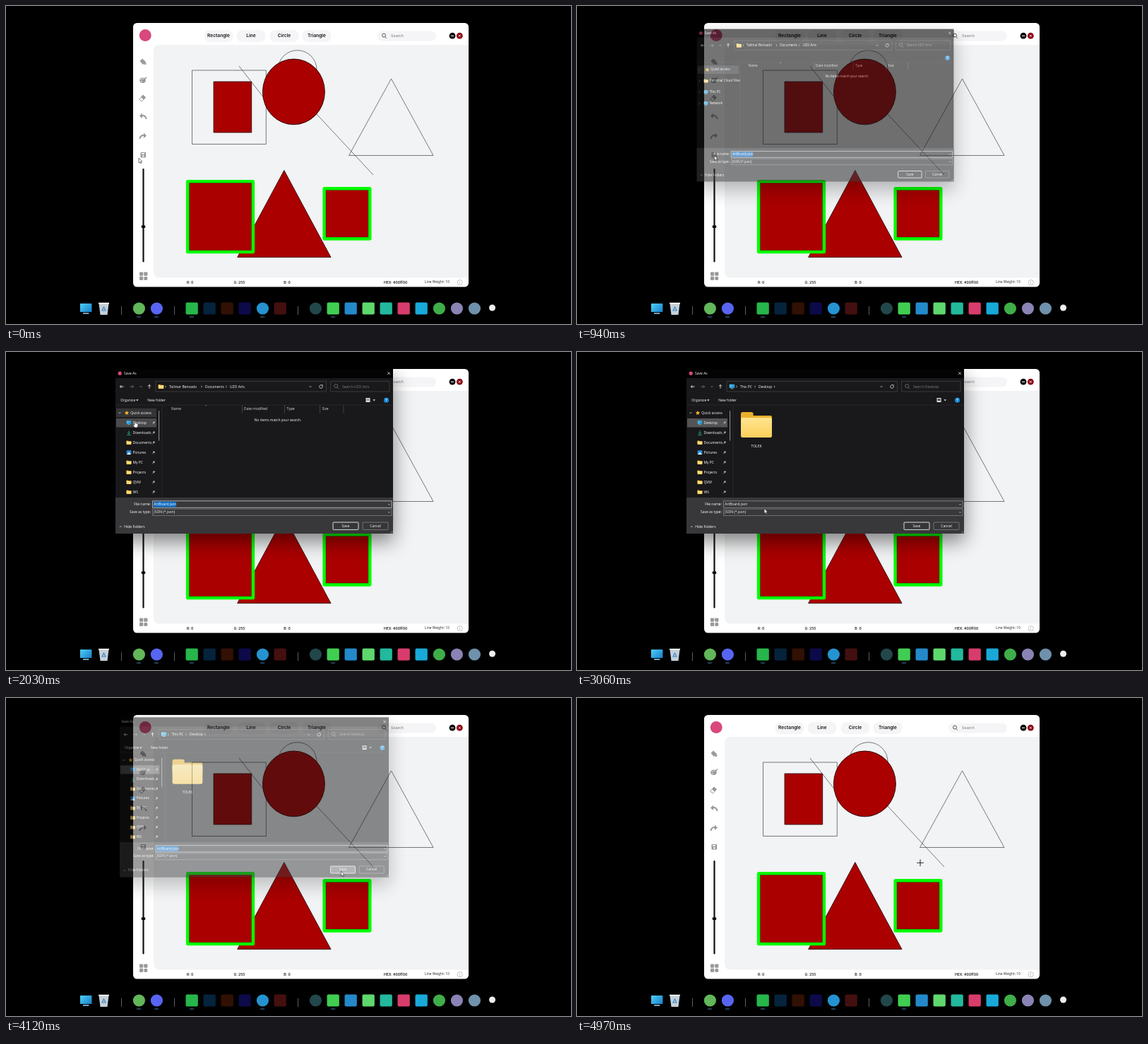
Animation of 800x450 px, one loop 5 s. Source, as an HTML page with a canvas:

```html
<!DOCTYPE html>
<html lang="en">
<head>
<meta charset="utf-8">
<title>Drawing app: save dialog</title>
<style>
  html, body { margin: 0; width: 100%; height: 100%; overflow: hidden; background: #000; }
  canvas { display: block; width: 800px; height: 450px; }
</style>
</head>
<body>
<canvas id="stage" width="800" height="450"></canvas>
<script>
const LOOP = 5000;
const stage = document.getElementById('stage').getContext('2d');
const layer = () => {
  const c = document.createElement('canvas');
  c.width = 800; c.height = 450;
  return c.getContext('2d');
};
const desktop = layer(), dialogLayer = layer();
const UI = '"Open Sans", "Noto Sans", sans-serif', APP = 'Inter, sans-serif';
const RED = '#aa0000', GREEN = '#00ff00';
const OWNER = 'Talimar Benvado', ART = 'UZO Arts';
const TIMES = { open: 905, loaded: 1120, pick: 2150, listed: 2280, field: 3250, close: 4060, gone: 4180 };
const HOVER_LAG = 90;
let g = desktop;

// ---- drawing helpers ----
function paint(fill, stroke, width = 0.8) {
  if (fill) { g.fillStyle = fill; g.fill(); }
  if (stroke) { g.strokeStyle = stroke; g.lineWidth = width; g.stroke(); }
}
function box(x, y, x2, y2, fill, stroke, width, r = 0) {
  g.beginPath();
  g.roundRect(x, y, x2 - x, y2 - y, r);
  paint(fill, stroke, width);
}
function oval(x, y, rx, ry, fill, stroke, width) {
  g.beginPath();
  g.ellipse(x, y, rx, ry, 0, 0, Math.PI * 2);
  paint(fill, stroke, width);
}
const dot = (x, y, r, fill, stroke, width) => oval(x, y, r, r, fill, stroke, width);
function poly(points, fill, stroke, width, closed = true) {
  g.beginPath();
  points.forEach(([x, y]) => g.lineTo(x, y));
  if (closed) g.closePath();
  paint(fill, stroke, width);
}
const line = (stroke, width, ...points) => poly(points, null, stroke, width, false);
function text(s, x, y, { size = 5, color = '#fff', font = UI, weight = 400, align = 'left' } = {}) {
  g.font = `${weight} ${size}px ${font}`;
  g.fillStyle = color;
  g.textAlign = align;
  g.textBaseline = 'middle';
  g.fillText(s, x, y);
}
function chevron(x, y, dx, dy, color = '#ddd') {
  // points along (dx, dy)
  line(color, 0.7, [x - dx - dy * 1.8, y - dy - dx * 1.8], [x + dx, y + dy], [x - dx + dy * 1.8, y - dy + dx * 1.8]);
}
function arrow(x, y, dx, dy, color, len = 2.6) {
  line(color, 0.8, [x - dx * len, y - dy * len], [x + dx * len, y + dy * len]);
  const ex = x + dx * len, ey = y + dy * len;
  line(color, 0.8, [ex - dx * 2 - dy * 2, ey - dy * 2 - dx * 2], [ex, ey], [ex - dx * 2 + dy * 2, ey - dy * 2 + dx * 2]);
}
function folder(x, y, w) {
  const h = w * 0.82, l = x - w / 2, t = y - h / 2;
  box(l, t, l + w * 0.4, t + h * 0.5, '#eab02c', null, 0, w * 0.06);
  box(l, t + h * 0.14, l + w, t + h * 0.6, '#eab02c', null, 0, w * 0.05);
  const shade = g.createLinearGradient(0, t, 0, t + h);
  shade.addColorStop(0, '#ffe9a0');
  shade.addColorStop(1, '#fdd05a');
  box(l, t + h * 0.22, l + w, t + h, shade, null, 0, w * 0.05);
}
function monitor(x, y, w) {
  const shade = g.createLinearGradient(x - w / 2, y - w / 2, x + w / 2, y + w / 2);
  shade.addColorStop(0, '#4fd3f7');
  shade.addColorStop(1, '#1272c4');
  box(x - w / 2, y - w * 0.45, x + w / 2, y + w * 0.28, shade, null, 0, w * 0.05);
  box(x - w * 0.25, y + w * 0.34, x + w * 0.25, y + w * 0.44, '#8cc8e6');
}
function magnifier(x, y, color) {
  dot(x, y - 0.5, 2.5, null, color, 0.8);
  line(color, 0.8, [x + 1.8, y + 1.5], [x + 3.8, y + 3.7]);
}

// ---- static desktop ----
function drawArt() {
  const ink = '#444';
  box(263.5, 91, 368.3, 195.5, null, ink, 0.7);
  box(294, 107, 347.7, 179, RED, '#200', 0.8);
  dot(412.5, 90.2, 27.5, null, ink, 0.7);
  line(ink, 0.7, [330, 85], [366, 131]);
  line(ink, 0.7, [438, 151], [520, 239]);
  oval(407.4, 121.4, 44, 46.4, RED, '#200', 0.9);
  poly([[545.5, 103], [605, 211.5], [485.5, 211.5]], null, ink, 0.7);
  poly([[393.8, 232.5], [460, 355.6], [327.6, 355.6]], RED, '#200', 0.8);
  g.lineJoin = 'round';
  for (const [x, y, x2, y2] of [[257.2, 248.2, 349.8, 348], [450.7, 258.4, 515.2, 329.4]]) {
    box(x, y, x2, y2, RED, GREEN, 4.6, 0.6);
    g.setLineDash([1, 1]);
    box(x + 2.3, y + 2.3, x2 - 2.3, y2 - 2.3, null, '#300', 0.7);
    g.setLineDash([]);
  }
  g.lineJoin = 'miter';
}
function drawTools() {
  const grey = '#999';
  poly([[189.5, 78], [193, 74.5], [198, 79], [194, 83]], grey);
  dot(197, 81.5, 1.6, grey);
  oval(193.5, 105.2, 4.2, 3.8, grey);
  [[191.5, 104], [194, 103], [192, 107]].forEach(([x, y]) => dot(x, y, 0.8, '#fff'));
  line(grey, 1.4, [195, 105], [199, 100.5]);
  poly([[188.7, 132], [194, 126], [197.6, 129.4], [192.3, 135]], null, grey, 1);
  poly([[191.2, 129.2], [194, 126], [197.6, 129.4], [194.8, 132.4]], grey);
  for (const [y, d] of [[155.5, 1], [183.5, -1]]) {
    const x = 194;
    poly([[x - 5 * d, y], [x - d, y - 4], [x - d, y + 3.5]], grey);
    g.beginPath();
    g.moveTo(x - d, y - 0.5);
    g.quadraticCurveTo(x + 4 * d, y - 0.5, x + 4.6 * d, y + 4.5);
    paint(null, grey, 2);
  }
  box(190.5, 207, 198, 214.5, grey, null, 0, 1);
  box(192, 208, 196, 209.8, '#fff');
  dot(194.3, 212.2, 1.2, '#fff');
  box(193.4, 230, 195.6, 362.5, '#111', null, 0, 1);
  box(191.8, 310.4, 197.2, 314, '#000', null, 0, 0.8);
  for (const x of [189, 195.2]) for (const y of [376.6, 382.8]) box(x, y, x + 5.2, y + 5.2, grey, null, 0, x > 190 && y > 380 ? 2.6 : 1);
}
function drawApp() {
  box(180, 24, 655, 397.5, '#fff', null, 0, 5.5);
  g.beginPath();
  g.roundRect(209, 55, 446, 329.5, [8, 0, 0, 8]);
  paint('#f1f3f4');
  dot(197.2, 41.5, 8.5, '#d8487c');
  [['Rectangle', 301], ['Line', 347], ['Circle', 394], ['Triangle', 440]].forEach(([s, x]) => {
    box(x - 20.5, 34, x + 20.5, 51, '#f5f5f7', null, 0, 8);
    text(s, x, 42.2, { size: 6.6, color: '#181818', font: APP, weight: 600, align: 'center' });
  });
  box(526, 35.5, 609, 49.5, '#f5f5f7', null, 0, 7);
  magnifier(535, 42, '#333');
  text('Search', 545, 42.7, { size: 5.4, color: '#777', font: APP });
  dot(632, 42.2, 4.4, '#000');
  line('#fff', 1.1, [629.8, 42.2], [634.2, 42.2]);
  dot(642.3, 42.2, 4.4, '#8c0010');
  line('#fff', 0.9, [640.8, 40.7], [643.8, 43.7]);
  line('#fff', 0.9, [643.8, 40.7], [640.8, 43.7]);
  const status = { size: 5, color: '#222', font: APP, weight: 600 };
  [['R: 0', 256], ['G: 255', 322.5], ['B: 0', 393.3], ['HEX: #00ff00', 535]].forEach(([s, x]) => text(s, x, 391, status));
  text('Line Weight: 10', 593, 391.2, { color: '#222', size: 4.9 });
  dot(642.7, 391.2, 3.6, null, '#999', 0.6);
  text('i', 642.7, 391.3, { color: '#777', align: 'center' });
  drawTools();
  drawArt();
}
function drawDock() {
  monitor(113.2, 428.5, 16.5);
  poly([[131.5, 421], [145.5, 421], [143.5, 437], [133.5, 437]], '#c6d0d8');
  line('#fff', 1.6, [131, 420.6], [146, 420.6]);
  poly([[136, 431], [138.5, 426], [141, 431]], null, '#3388cc', 1.2);
  [163.5, 238.5, 413.5].forEach(x => line('#777', 0.8, [x, 425], [x, 437]));
  [188, 213, 263, 363, 463].forEach(x => oval(x, 440, 3.5, 1, '#26435c'));
  const rounds = [[188, '#62b75a'], [213, '#5865f2'], [363, '#2593d1'], [438, '#22474a'], [613, '#3fae49'], [638, '#8a83b5'], [663, '#6f91ab']];
  rounds.forEach(([x, color]) => dot(x + 0.4, 428, 8.6, color));
  const squares = [[263, '#27b64b'], [288, '#06233d'], [313, '#321004'], [338, '#0d0a4a'], [388, '#43100f'],
    [463, '#41cd52'], [488, '#2489ca'], [513, '#5ed86c'], [538, '#22b99d'], [563, '#d83c6c'], [588, '#18a9d8']];
  squares.forEach(([x, color]) => box(x - 8.5, 419.5, x + 8.8, 436.5, color, null, 0, 2));
  dot(688.5, 427, 4.5, '#eee');
}

// ---- save dialog ----
const PLACES = ['Desktop', 'Downloads', 'Documents', 'Pictures', 'My PC', 'Projects', 'QVM', 'WS'];

function placeIcon(name, x, y) {
  if (name === 'Desktop') return monitor(x, y, 6.5);
  if (name === 'Downloads') {
    arrow(x, y - 0.7, 0, 1, '#25c18a', 2.4);
    return line('#25c18a', 0.9, [x - 2.8, y + 3.2], [x + 2.8, y + 3.2]);
  }
  if (name === 'Pictures') {
    box(x - 3.3, y - 3, x + 3.3, y + 3, '#2b8fe0', null, 0, 0.6);
    return poly([[x - 2.8, y + 2.7], [x, y - 0.5], [x + 2.8, y + 2.7]], '#fff');
  }
  folder(x, y, 6.8);
}
function pin(x, y) {
  line('#aaa', 0.7, [x - 2, y + 2.2], [x, y]);
  poly([[x - 1.4, y - 0.8], [x + 0.8, y - 2.2], [x + 2, y - 0.8], [x + 0.6, y + 1.4]], '#aaa');
}
function star(x, y, r) {
  const points = Array.from({ length: 10 }, (_, i) => {
    const a = i * Math.PI / 5 - Math.PI / 2, d = i % 2 ? r * 0.45 : r;
    return [x + d * Math.cos(a), y + d * Math.sin(a)];
  });
  poly(points, '#fbb829');
}
function drawSidebar(t) {
  const loaded = t >= TIMES.loaded;
  if (t < TIMES.pick) box(156, 79.7, loaded ? 213 : 219, 92.3, '#353537');
  if (loaded) chevron(161, 86.2, 0, 0.8); else chevron(159, 86, 0.8, 0, '#888');
  star(171, 86.2, 3.4);
  text('Quick access', 176.3, 86.2);
  if (!loaded) {
    ['Personal Cloud Files', 'This PC', 'Network'].forEach((s, i) => {
      const y = 103.2 + i * 17.3;
      chevron(159, y, 0.8, 0, '#888');
      if (i) monitor(169, y, 6.5); else folder(169, y, 6.5);
      text(s, 174.5, y);
    });
    return;
  }
  const seen = pointerAt(t - HOVER_LAG), hovered = Math.round((seen.y - 100) / 14);
  PLACES.forEach((name, i) => {
    const y = 100.2 + i * 14;
    const chosen = i === 0 && t >= TIMES.pick;
    if (chosen || (seen.x < 213 && hovered === i)) box(156, y - 6.3, 213, y + 6.3, chosen ? '#545456' : '#4a4a4c');
    placeIcon(name, 174, y);
    text(name, 179.5, y);
    pin(209, y);
  });
  box(216, 83, 217.1, 125.5, '#8a8a8a', null, 0, 0.5);
}
function drawAddress(listed) {
  arrow(164, 49, -1, 0, '#fff');
  arrow(178, 49, 1, 0, '#777');
  chevron(191, 49, 0, 0.8, '#999');
  arrow(203, 49, 0, -1, '#fff');
  box(212, 41.5, 453.5, 56, null, '#484848', 0.7);
  box(459.5, 41.5, 543, 56, null, '#484848', 0.7);
  if (listed) monitor(219.5, 49, 7.5); else folder(219.5, 49, 7.5);
  const crumbs = listed ? [['This PC', 231], ['Desktop', 257]] : [[OWNER, 231], ['Documents', 282], [ART, 317]];
  crumbs.forEach(([s, x]) => {
    chevron(x - 5, 49, 0.7, 0);
    text(s, x, 49.2);
  });
  if (listed) chevron(279.5, 49, 0.7, 0);
  chevron(431, 49, 0, 0.8);
  g.beginPath();
  g.arc(446, 49, 2.3, -0.3, Math.PI * 1.6);
  paint(null, '#eee', 0.7);
  line('#eee', 0.7, [446.2, 46.7], [448.2, 46.7], [448.2, 48.5]);
  magnifier(467.2, 48.5, '#777');
  text('Search ' + (listed ? 'Desktop' : ART), 476, 49.2, { color: '#808080' });
}
function drawListing(listed) {
  if (listed) {
    folder(254, 103, 44);
    return text('TOLEK', 254, 134, { align: 'center' });
  }
  [['Name', 234], ['Date modified', 337], ['Type', 397.5], ['Size', 447.5]].forEach(([s, x]) => text(s, x, 80.8, { color: '#ddd' }));
  [334.5, 394.5, 444.5, 478].forEach(x => line('#555', 0.7, [x, 75], [x, 86.5]));
  chevron(283, 75.8, 0, -0.6, '#999');
  text('No items match your search.', 385, 96.3, { align: 'center' });
}
function button(label, x, lit, strong) {
  box(x, 241, x + 36, 251.4, lit ? '#777779' : '#363638', strong ? '#eee' : '#9a9a9a', strong ? 0.9 : 0.6, 1);
  text(label, x + 18, 246.2, { align: 'center' });
}
function drawFields(t, cursor) {
  const focused = t < TIMES.pick || t >= TIMES.field;
  box(155, 206, 548, 257, '#38383a');
  text('File name:', 205, 215.7, { align: 'right' });
  text('Save as type:', 205, 226.8, { align: 'right' });
  box(207.5, 210.8, 546, 220.3, '#38383a', focused ? '#ddd' : '#999', 0.7);
  box(207.5, 222.2, 546, 231.5, '#38383a', '#888', 0.7);
  if (focused) box(209, 211.7, 240.5, 219.5, '#1470c8');
  text('ArtBoard.json', 209.3, 215.7);
  text('JSON (*.json)', 209.3, 226.8);
  chevron(542.5, 215.7, 0, 0.7);
  chevron(542.5, 226.8, 0, 0.7);
  chevron(162.2, 247.2, 0, -0.8);
  text('Hide Folders', 167.3, 247.4);
  button('Save', 463, cursor.x > 463 && cursor.y > 240, true);
  button('Cancel', 505, false, false);
  for (let i = 1; i < 4; i++) line('#999', 0.5, [547.5 - i * 1.2, 256.5], [547.5, 256.5 - i * 1.2]);
}
function drawDialog(t, cursor) {
  const listed = t >= TIMES.listed, closing = t >= TIMES.close;
  g.save();
  g.shadowColor = 'rgba(0,0,0,.48)';
  g.shadowBlur = 26;
  g.shadowOffsetY = 11;
  box(155, 24, 548, 257, '#19181a');
  g.restore();
  box(155, 24, 548, 37, '#030303');
  if (!closing) dot(161.2, 30.2, 2.6, '#d8487c');
  text('Save As', closing ? 157.5 : 167, 30.6);
  line('#fff', 0.7, [540.2, 28.4], [543.8, 32]);
  line('#fff', 0.7, [543.8, 28.4], [540.2, 32]);
  drawAddress(listed);
  if (t >= TIMES.loaded) {
    text('Organize', 162.3, 68.2);
    poly([[184, 67.3], [187.6, 67.3], [185.8, 69.4]], '#ddd');
    text('New folder', 200.3, 68.2);
    box(509.5, 65, 515.5, 71, '#ddd');
    box(510.6, 66.2, 514.4, 69, listed ? '#444' : '#999');
    poly([[519.5, 67.3], [523, 67.3], [521.2, 69.4]], '#ddd');
  }
  dot(538.5, 68.2, 3.6, '#1787d4');
  text('?', 538.5, 68.4, { weight: 700, align: 'center' });
  line('#2c2c2e', 0.7, [155, 75], [548, 75]);
  line('#333', 0.7, [221, 75], [221, 206]);
  drawSidebar(t);
  drawListing(listed);
  drawFields(t, cursor);
}
function dialogPose(t) {
  if (t < TIMES.open || t >= TIMES.gone) return null;
  if (t >= TIMES.close) {
    const p = (t - TIMES.close) / 120;
    return { scale: 1 - 0.06 * p, alpha: 1 - p };
  }
  const p = Math.min(1, (t - TIMES.open) / 200);
  return { scale: 1 - 0.135 * (1 - p) ** 3, alpha: Math.min(1, (t - TIMES.open) / 60) };
}

// ---- pointer ----
const PATH = [
  [0, 188, 215], [300, 188, 215], [740, 194.5, 211.5], [1150, 194.5, 211.5], [1330, 193, 180.5],
  [1720, 183, 97.5], [2420, 183, 97.5], [3030, 265.5, 222.5], [3180, 262, 213], [3400, 262, 213],
  [3860, 474.3, 245], [4250, 474.3, 245], [4880, 486, 233.2], [5000, 486, 233.2],
];
function pointerAt(t) {
  const i = Math.max(1, PATH.findIndex(([at]) => at >= t));
  const [t0, x0, y0] = PATH[i - 1], [t1, x1, y1] = PATH[i];
  const p = (t - t0) / (t1 - t0), e = p * p * (3 - 2 * p);
  return { x: x0 + (x1 - x0) * e, y: y0 + (y1 - y0) * e };
}
function drawPointer(t, { x, y }) {
  if (t >= TIMES.gone) {
    line('#222', 1, [x - 4.8, y], [x + 4.8, y]);
    return line('#222', 1, [x, y - 4.8], [x, y + 4.8]);
  }
  g.save();
  g.translate(x, y);
  g.lineJoin = 'round';
  if (t >= TIMES.loaded && x < 215 && y < 206) {
    poly([[-1.1, 0], [0.3, 0], [0.5, 3.2], [3.6, 4], [4, 6.2], [2.9, 9.4], [-0.9, 9.4], [-3.2, 5.6], [-2.3, 5], [-1.1, 6]], '#fff', '#222', 0.6);
  } else {
    poly([[0, 0], [0, 7], [1.6, 5.6], [2.7, 8], [3.8, 7.5], [2.8, 5.2], [4.8, 5]], '#fff', '#222', 0.6);
  }
  g.restore();
}

function render(t) {
  const cursor = pointerAt(t), pose = dialogPose(t);
  stage.drawImage(desktop.canvas, 0, 0);
  if (pose) {
    g = dialogLayer;
    g.clearRect(0, 0, 800, 450);
    g.save();
    g.translate(351.5, 140.5);
    g.scale(pose.scale, pose.scale);
    g.translate(-351.5, -140.5);
    drawDialog(t, cursor);
    g.restore();
    stage.globalAlpha = pose.alpha;
    stage.drawImage(dialogLayer.canvas, 0, 0);
    stage.globalAlpha = 1;
  }
  g = stage;
  drawPointer(t, cursor);
}

desktop.fillStyle = '#000';
desktop.fillRect(0, 0, 800, 450);
drawApp();
drawDock();

const start = performance.now();
function tick() {
  render((performance.now() - start) % LOOP);
  requestAnimationFrame(tick);
}
tick();
</script>
</body>
</html>
```
